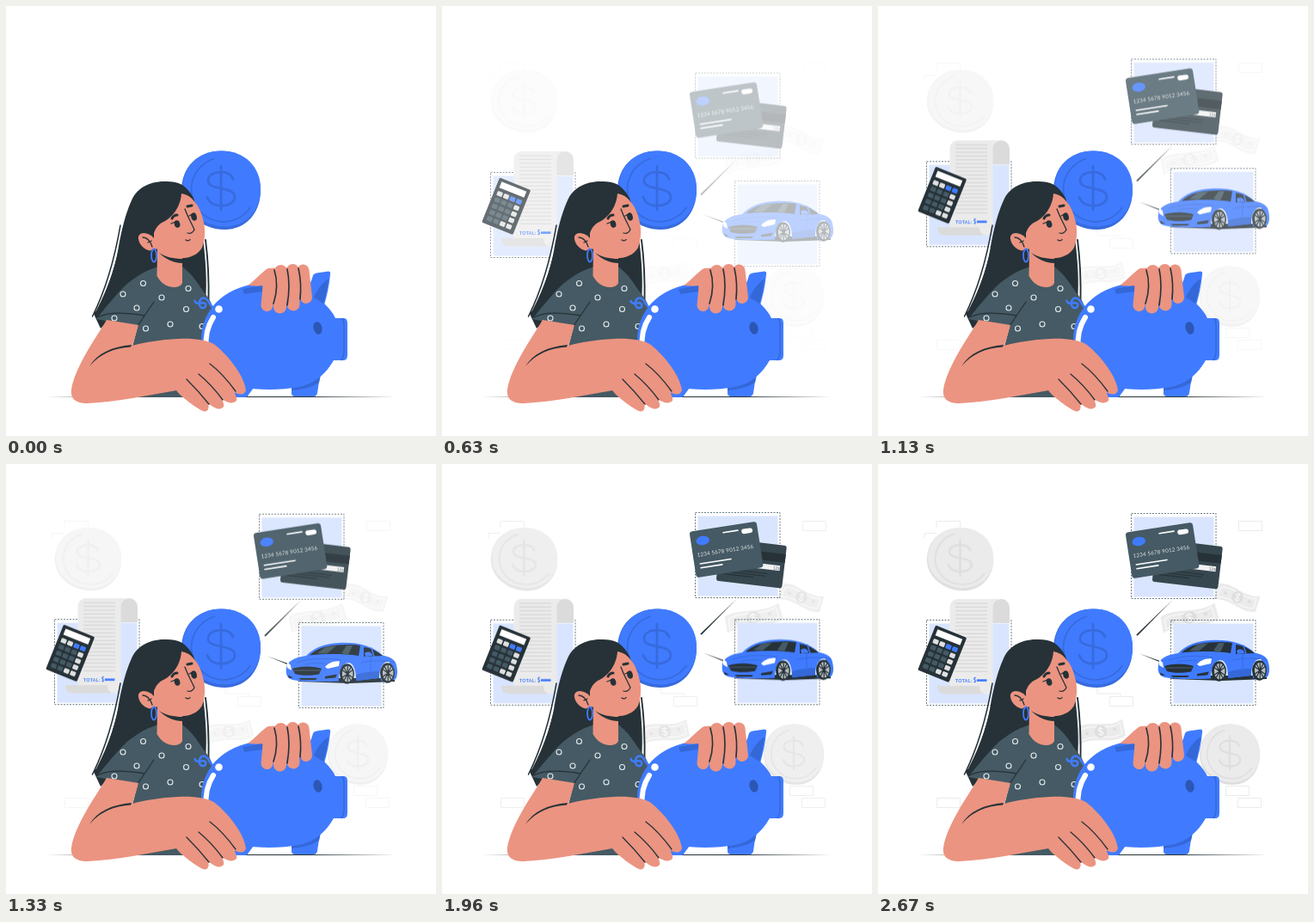
These frames come from a looping animation (500 px wide and 500 px high, 2.93 s). An HTML page without scripts:

```html
<!DOCTYPE html>
<html lang="en">
<head>
<meta charset="utf-8">
<title>Saving up</title>
<style>
html, body { margin: 0; width: 100%; height: 100%; overflow: hidden; background: #fff; }
svg { display: block; width: 100vw; height: 100vh; }
.ln { fill: none; stroke-linecap: round; stroke-linejoin: round; }
.ink { stroke: #263238; }
.skin { fill: #eb9481; }
.skinln { stroke: #eb9481; }
.hair { fill: #263238; }
.blue { fill: #407bff; }
.deep { fill: #3468d8; }
.tint { fill: #d9e5ff; }
.dash { fill: none; stroke: #455a64; stroke-width: .8; stroke-dasharray: 2 1.5; }
.coin { --face: #407bff; --edge: #376bdd; }
.pale { --face: #ebebeb; --edge: #dedede; }
.back { animation: show-back 2930ms linear infinite; }
.left { animation: show-left 2930ms linear infinite, rise-left 2930ms linear infinite; }
.cards { animation: show-right 2930ms linear infinite, rise-cards 2930ms linear infinite; }
.car { animation: show-right 2930ms linear infinite, rise-car 2930ms linear infinite; }
@keyframes show-back { 0%, 6% { opacity: 0 } 45% { opacity: .46 } 81%, 100% { opacity: 1 } }
@keyframes show-left { 0%, 6% { opacity: 0 } 28%, 100% { opacity: 1 } }
@keyframes show-right { 0%, 7% { opacity: 0 } 21.5% { opacity: .35 } 32.8% { opacity: .68 } 45.4% { opacity: .93 } 52%, 100% { opacity: 1 } }
@keyframes rise-left {
  0%, 6% { transform: translateY(25px) }
  14% { transform: translateY(20px) }
  21.5% { transform: translateY(12px) }
  27% { transform: translateY(5px) }
  32.8% { transform: translateY(.5px) }
  40% { transform: translateY(-1px) }
  57% { transform: translateY(-.5px) }
  75%, 100% { transform: none }
}
@keyframes rise-cards {
  0%, 7% { transform: translateY(25px) }
  14% { transform: translateY(24px) }
  21.5% { transform: translateY(20.5px) }
  32.8% { transform: translateY(9.7px) }
  39% { transform: translateY(4px) }
  45.4% { transform: translateY(.7px) }
  51% { transform: translateY(-1.5px) }
  57% { transform: translateY(-2px) }
  75% { transform: translateY(-.2px) }
  80%, 100% { transform: none }
}
@keyframes rise-car {
  0%, 7% { transform: translateY(25px) }
  14% { transform: translateY(24.5px) }
  21.5% { transform: translateY(22px) }
  32.8% { transform: translateY(12px) }
  39% { transform: translateY(7px) }
  45.4% { transform: translateY(3px) }
  51% { transform: translateY(0) }
  57% { transform: translateY(-1px) }
  75% { transform: translateY(-.5px) }
  91%, 100% { transform: none }
}
text { font-family: Lato, Inter, sans-serif; }
</style>
</head>
<body>
<svg viewBox="0 0 500 500">
<defs>
  <path id="usd" class="ln" d="M14-11C12-17 6-19 0-19C-9-19-15-15-15-9C-15 3 16-3 16 10C16 16 9 20 0 20C-8 20-14 16-16 10M0-26V25"/>
  <path id="disc" d="M-46 0C-46-27-27-46 0-46S46-27 46 0 28 45.500 4 45.500-46 28-46 0Z"/>
  <g id="coin">
    <use href="#disc" fill="var(--edge)"/>
    <use href="#disc" transform="translate(.7 -1.800) scale(.985 .96)" fill="var(--face)"/>
    <g stroke="var(--edge)">
      <path class="ln" stroke-width="1.800" d="M-8-37A37.500 37.500 0 1 0 34 20"/>
      <use href="#usd" y="-2.300" stroke-width="2.800"/>
    </g>
  </g>
  <g id="bill">
    <path fill="#ebebeb" d="M-30-8C-14-16 10-1 30-10L31 9C12 17-10 3-31 11Z"/>
    <path class="ln" stroke="#fff" stroke-width=".8" d="M-26-5C-12-11 10 1 26-6L27 6C12 12-10 1-27 7Z"/>
    <ellipse rx="8" ry="7" fill="#dedede"/>
    <use href="#usd" transform="scale(.2)" stroke="#f8f8f8" stroke-width="6"/>
    <circle cx="-18" r="2" fill="#dedede"/><circle cx="18" r="2" fill="#dedede"/>
  </g>
  <path id="brick" d="M0 0H27V11H0Z"/>
  <rect id="key" width="6.400" height="5.400" rx="1.200"/>
  <g id="keys">
    <use href="#key"/><use href="#key" x="8"/><use href="#key" x="16"/><use href="#key" x="24"/>
  </g>
  <g id="panel">
    <rect class="tint" x="3" y="4" width="93" height="93"/>
    <rect class="dash" width="98.500" height="99"/>
  </g>
  <g id="wheel">
    <ellipse rx="8.500" ry="11.800" fill="#263238"/>
    <ellipse cx=".7" rx="6.300" ry="9.300" fill="#b4bcc0"/>
    <path class="ln ink" stroke-width="1.200" d="M.7-9V9M-5-4L6 4M-5 4L6-4M-3-7L4 7M-3 7L4-7"/>
    <ellipse cx=".7" rx="1.600" ry="2.200" fill="#263238"/>
  </g>
  <pattern id="rows" width="38" height="4.400" patternUnits="userSpaceOnUse" x="90" y="160">
    <rect y="1.500" width="37" height="1.200" fill="#d5d5d5"/>
  </pattern>
</defs>

<rect width="500" height="500" fill="#fff"/>

<g class="back">
  <g fill="none" stroke="#ebebeb">
    <path d="M68 74V66.500H95.500V74M54 87V80.500H68"/>
    <use href="#brick" x="419.500" y="66.500"/>
    <use href="#brick" x="269.500" y="270.500"/>
    <path d="M255 260V267H282V270"/>
    <use href="#brick" x="68.500" y="388.500"/>
    <use href="#brick" x="404.500" y="374.500"/>
    <use href="#brick" x="418.500" y="388.500"/>
  </g>
  <use href="#coin" class="pale" transform="translate(95.500 111) scale(.84 .8)"/>
  <use href="#coin" class="pale" transform="translate(409 338) scale(.76 .77)"/>
  <use href="#bill" transform="translate(362 178.500) rotate(-13) scale(1.08 1)"/>
  <use href="#bill" transform="translate(418 155) rotate(19) scale(.82 1)"/>
  <use href="#bill" transform="translate(259 311) rotate(-9) scale(.9 1.05)"/>
</g>

<g class="left">
  <use href="#panel" x="56.500" y="181.500"/>
  <path fill="#dbdbdb" d="M133 185V168C133 161 137 157 143 157C149 157 153 161 153 168V185Z"/>
  <path fill="#ebebeb" d="M83.500 258V168C83.500 161 87 157 93 157H143C137 157 133.500 161 133.500 168V258C133.500 264 130 267.500 126 267.500L83.500 262Z"/>
  <path fill="#dbdbdb" d="M69 258H118C118 264 121 267.500 126 267.500H78C72 267.500 69 264 69 258Z"/>
  <rect x="90" y="160" width="37" height="84" fill="url(#rows)"/>
  <text x="90" y="253.500" font-size="5.300" font-weight="700" fill="#407bff" letter-spacing=".25">TOTAL: <tspan font-size="6.500">$</tspan></text>
  <rect class="blue" x="115" y="250.300" width="11.500" height="2.600"/>
  <g transform="translate(67 187.500) rotate(21.800)">
    <rect width="39" height="56" rx="1.500" fill="#263238"/>
    <rect x="4" y="3.500" width="31" height="7.500" fill="#fff"/>
    <g transform="translate(4 15)" fill="#455a64">
      <use href="#keys"/><use href="#keys" y="7.800"/><use href="#keys" y="15.600"/><use href="#keys" y="23.400"/><use href="#keys" y="31.200"/>
      <g fill="#e0e0e0">
        <use href="#key"/><use href="#key" x="8"/>
        <use href="#key" x="24" y="7.800"/><use href="#key" x="24" y="15.600"/><use href="#key" x="24" y="23.400"/>
        <use href="#key" x="16" y="31.200"/><use href="#key" x="24" y="31.200"/>
      </g>
      <g class="blue"><use href="#key" x="16"/><use href="#key" x="24"/></g>
    </g>
  </g>
</g>

<g class="cards">
  <path class="hair" d="M300.300 198.500L343 157.500L301.700 199.800Z"/>
  <use href="#panel" x="294.500" y="57.500"/>
  <g transform="translate(324.500 87) rotate(6.700)">
    <rect width="77" height="50" rx="3" fill="#37474f"/>
    <rect y="10" width="77" height="10" fill="#263238"/>
    <rect x="8" y="24" width="64" height="6" fill="#f2f2f2"/>
    <text x="64" y="29" font-size="4.500" fill="#455a64">123</text>
    <path class="ln ink" stroke-width="1.200" d="M8 35H58M8 38H56M8 41H42"/>
  </g>
  <g transform="translate(287.500 79.800) rotate(-8.800)">
    <rect width="79" height="54" rx="3.500" fill="#455a64"/>
    <ellipse class="blue" cx="14" cy="12.500" rx="7.800" ry="5.200"/>
    <path class="ln" stroke="#fff" stroke-width="1.700" d="M39 7H56M7 38.700H43M7 43.500H32"/>
    <rect x="60" y="6.500" width="13" height="5.600" rx="2.800" fill="#fff"/>
    <text x="5" y="30.300" font-size="6.300" fill="#dfe4e6" letter-spacing=".15">1234 5678 9012 3456</text>
  </g>
</g>

<g class="car">
  <path class="hair" d="M304 220.500L328 229L327 230Z"/>
  <use href="#panel" x="340.500" y="181.500"/>
  <path class="hair" d="M334 246H452V250L400 252L342 250Z"/>
  <path class="blue" d="M326 234C327 227 334 222 349 220C358 211 369 206 387 205C409 204 425 208 438 219.500C446 221 453 224 454 231C456 239 455 246 452 248L436 249C434 236 452 226 444 227C436 227 434 240 434 246L407 249C407 236 404 228 398 228C390 229 387 239 387 249.500C370 250.500 345 250.500 333 248C326 246 325 240 326 234Z"/>
  <path class="deep" d="M407 242C416 239 426 238 434 238V246L407 249Z"/>
  <path class="hair" d="M353 219.500C361 212 370 208.500 386 207.500C397 206.500 406 207 412 208L410 220C393 217.500 372 217.500 353 219.500Z"/>
  <path fill="#455a64" d="M362 217L372 209.500L384 208.500L373 217.500ZM390 217L396 208H403L398 219Z"/>
  <path class="hair" d="M416 210C425 211 432 215 438 220L416 221Z"/>
  <path class="ln" stroke="#407bff" stroke-width="1.400" d="M425 211L428 221"/>
  <path class="blue" d="M417 217C421 214 426 216 426 220L418 221ZM348 223L350 220.500L355 222L352 225Z"/>
  <path class="ln" stroke="#3468d8" stroke-width=".8" d="M338 228C353 223 372 222 389 225M413 228C426 225 440 225 452 228M424 222V238M348 230C356 228 364 228 371 229"/>
  <path class="hair" d="M333 235C341 231.500 359 231.500 367 235L364 241.500C353 243.500 342 243 336 241Z"/>
  <path class="ln" stroke="#607d8b" stroke-width=".6" d="M335 237H365"/>
  <path class="hair" d="M328 242.500L334 245.500L329 246ZM371 244L385 241.500L383 245.500L371 246.500ZM340 246H362L360 248H343Z"/>
  <path fill="#fff" d="M327 227L331 231L332 237L327 234ZM371 233C375 228.500 381 225.500 388 226.500L387 232L374 235Z"/>
  <use href="#wheel" x="396.500" y="241"/>
  <use href="#wheel" x="443.500" y="240"/>
</g>

<use href="#coin" class="coin" x="250" y="214.500"/>

<path d="M47 454.500L150 454H350L453 454.500L350 455H150Z" fill="#263238"/>

<g id="woman">
  <path class="hair" d="M187 204C167 203 152 212 146 226C137 246 133 268 130 285C126 306 117 330 102 358L110 375C125 362 140 345 150 330L232 344C234 320 232 295 229.500 274C228 245 219 215 203 207C199 205 193 204 187 204Z"/>
  <path class="ln" stroke="#fff" stroke-width="1.800" d="M131 268C128 298 118 328 104 354"/>
  <path class="ln ink" stroke-width="1.500" d="M133 255C126 296 115 332 100.500 361"/>
  <path class="ln ink" stroke-width="1.900" d="M232 272C235 295 236 322 235.500 346"/>
  <path fill="#455a64" d="M177 303C160 308 143 319 131 333C121 344 112 355 105 364L153 373L147 396L150 455H230V400L240 352C240 343 232 336 226 327C220 317 213 309 205 303Z"/>
  <path class="ln ink" stroke-width="1.300" d="M107 362C119 355 143 357 161 360M172 344L153 372"/>
  <path class="skin" d="M176 280L175.500 314C180 322 187 327 195 327C200 327 204 325 205 322V290Z"/>
  <path class="hair" d="M178 287C186 292 195 294 205 294V299C196 299 186 295 178 287Z"/>
  <path class="skin" d="M172 262L186 236L203 216C216 220 226 233 229 248C232 258 232 271 228 281C223 290 212 294 200 293C187 291 177 285 172 279Z"/>
  <path class="hair" d="M168 270C168 245 174 222 190 207C202 206 212 211 219 225C214 221 209 219 204 218C203 234 193 247 181 252C176 255 173 260 171 267Z"/>
  <path class="skin" d="M172 270C166 263 156 262 154 268C153 276 161 285 171 285L177 281Z"/>
  <path class="ln ink" stroke-width="1.300" d="M159 269C164 269 168 274 170 280M165 275L169 273"/>
  <path class="hair" d="M168 284L174 282L174 292L168 290Z"/>
  <ellipse class="ln" cx="172" cy="290" rx="3" ry="7.500" stroke="#407bff" stroke-width="1.800"/>
  <ellipse class="hair" cx="199" cy="253.500" rx="3.300" ry="4.300" transform="rotate(-15 199 253.500)"/>
  <ellipse class="hair" cx="218.500" cy="245" rx="3.300" ry="4.700" transform="rotate(-15 218.500 245)"/>
  <path class="ln ink" stroke-width="1.300" d="M192 253L197 251M213 244L217 242M208 236C212 247 216 253 219 260C217 264 214 265 211 264M209 272C211 273.500 213 273 214 271.500"/>
  <path class="ln ink" stroke-width="3" d="M193 247Q195 243 199 243M211 233L216 232"/>
  <g class="ln" stroke="#e6ecef" stroke-width="1.100">
    <circle cx="159.500" cy="322.500" r="3"/><circle cx="181" cy="339" r="3"/><circle cx="212" cy="328.500" r="3"/>
    <circle cx="136" cy="335" r="3"/><circle cx="152" cy="351" r="3"/><circle cx="126" cy="363" r="3"/>
    <circle cx="162.500" cy="375" r="3"/><circle cx="191" cy="370" r="3"/><circle cx="209.500" cy="352.500" r="3"/><circle cx="228" cy="372.500" r="3"/>
  </g>
</g>

<g id="pig">
  <path class="ln" stroke="#407bff" stroke-width="2.600" d="M243 352C236 349 236 340 230 339.500C224 340 223 349 228 351C233 352 234 345 229 345C224 346 221 347 219.500 343"/>
  <path class="blue" d="M264 432L288 444L282 452Q281 455 278 455H266ZM332 443C345 443 356 437 365 430L362 450Q361 454 358 454H336Q332 454 332 450Z"/>
  <path class="deep" d="M332 443Q352 442 366 429L364 438Q350 446 332 447Z"/>
  <path class="blue" d="M227 389C227 350 258 322 306 322C331 322 356 330 371 347C377 353 381 358 383 363H393Q397 363 397 369V406Q397 412 392 412H381C372 428 358 440 340 443C320 447 292 447 274 443C244 434 227 414 227 389Z"/>
  <path class="ln" stroke="#3468d8" stroke-width="1.500" d="M391 363.500Q393 366 393 372V402Q393 408 390 411.500"/>
  <path class="blue" d="M349 329C354 324 356 317 357 313Q358 311 361 310.500L375 308.500Q378 309 377 312C376 325 373 337 370 348L352 342Z"/>
  <path class="deep" d="M375 317C368 322 361 330 358 339L369 346C372 337 374 327 375 317Z"/>
  <ellipse cx="362.500" cy="374.500" rx="5" ry="7.300" fill="#2b56b4" transform="rotate(-15 362.500 374.500)"/>
  <circle cx="247.500" cy="352.500" r="4.300" fill="#fff"/>
  <path class="ln" stroke="#fff" stroke-width="6" d="M241 362C234.500 372 231.500 385 233 398"/>
</g>

<g id="hands">
  <path class="skin" d="M281 325C290 319 296 310 305 305L345 303L353 324L298 336L299 326Z"/>
  <path class="deep" d="M275 329L298 325V332L277 335Z"/>
  <path class="ln skinln" stroke-width="14" d="M307 312L303.500 348M345.500 307.500L349 339"/>
  <path class="ln skinln" stroke-width="15" d="M319.500 308.500L318.500 350M333.500 307.500L334 347"/>
  <path class="ln ink" stroke-width="1.600" d="M312 307C316 320 315 334 311 346M327 306C330 320 329 336 327 348M340 305C343 318 343 331 342 341"/>
  <path class="skin" d="M117 365C105 385 80 420 76 446C75 456 80 462 95 462C130 460 165 453 198 447C204 455 222 468 229 471C234 473 237 468 235 463L238 464C244 469 250 470 253 466C254 463 252 460 251 457C258 462 264 463 268 459C269 456 267 452 265 449C271 452 277 453 279 447C277 430 260 408 243 394C235 388 215 386 200 387C180 388 160 391 147 395L154 371Z"/>
  <path class="ln ink" stroke-width="1.300" d="M237 416C249 425 259 437 267 448M224 428C235 437 244 447 252 458M210 434C219 443 228 453 236 463"/>
  <path class="hair" d="M97 419C106 404 123 396 146 394L145 396.500C125 398 110 404 97 419Z"/>
</g>
</svg>
</body>
</html>
```
